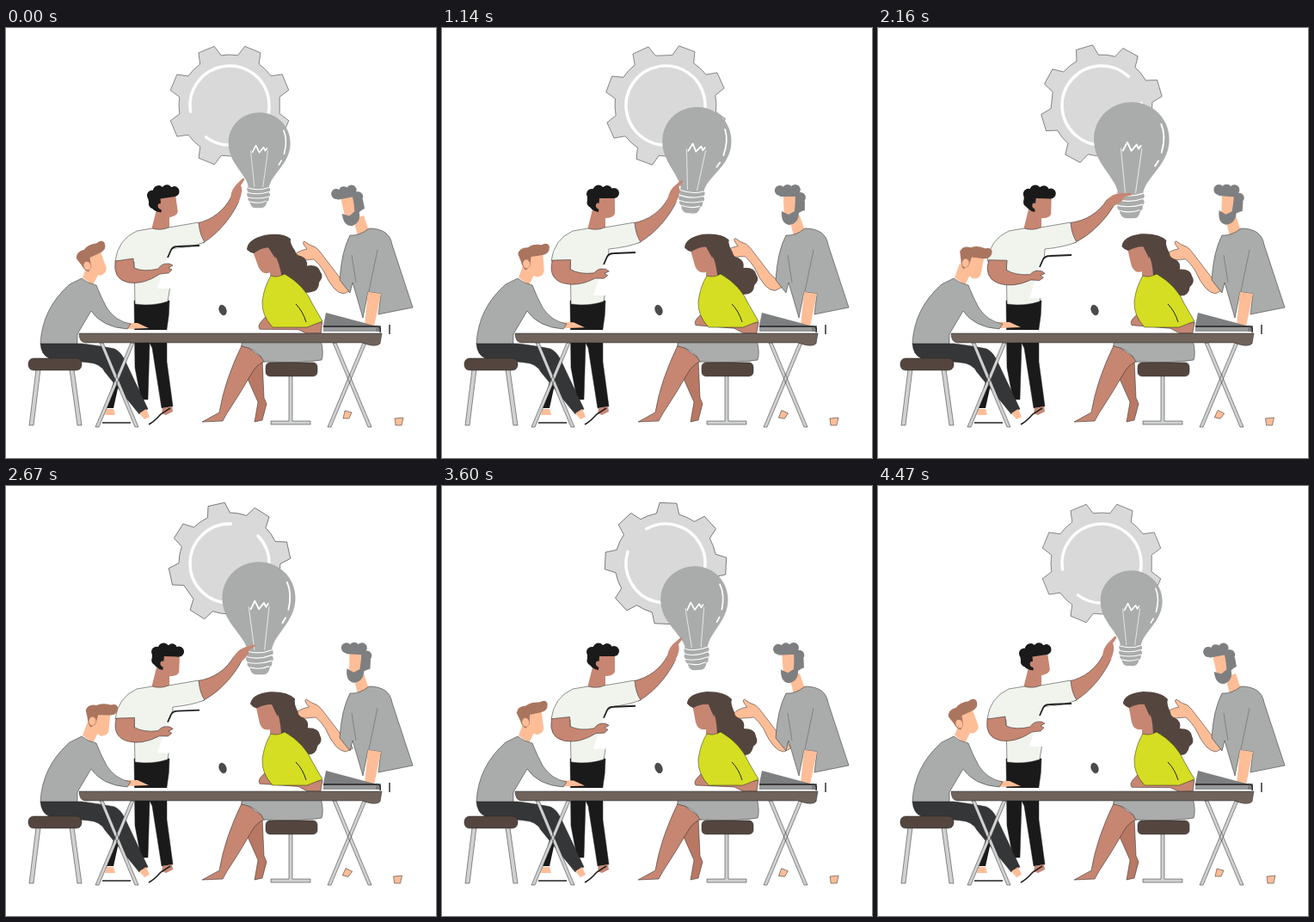
These frames come from a looping animation (500x500 px, 4530 ms). An HTML page:

```html
<!DOCTYPE html>
<html lang="en">
<head>
<meta charset="utf-8">
<title>Team at a table</title>
<style>
  html, body { margin: 0; width: 100%; height: 100%; overflow: hidden; background: #fff; }
  svg { display: block; width: 100vw; height: 100vh; }
  .edge { stroke: #222; stroke-width: .5; }
  .line { fill: none; stroke: #222; }
  .gray { fill: #a9acaa; }
  .ash { fill: #7d7f80; }
  .peach { fill: #fdbd97; }
  .tan { fill: #c68672; }
  .black { fill: #1a1a1b; }
  .brown { fill: #54463f; }
  .shirt { fill: #f0f4ed; }
  .leg { fill: #d0d1d1; }
  .white { fill: none; stroke: #fff; stroke-linecap: round; stroke-linejoin: round; }
</style>
</head>
<body>
<svg viewBox="0 0 500 500">
  <g id="gear">
    <path id="teeth" class="edge" fill="#d9d9d9"/>
    <circle class="white" r="46" stroke-width="3.4" pathLength="360" stroke-dasharray="316 44" transform="rotate(171)"/>
  </g>

  <g id="bulb">
    <path class="gray" d="M0-55.500C20-55.500 36-40 36-20C36 0 22 10 14 25Q12 29 12 33H-12Q-12 29-14 25C-22 10-36 0-36-20C-36-40-20-55.500 0-55.500Z"/>
    <path class="gray" d="M-12 31H12Q15 34 12 37Q15 40 12 43Q13 47 10 48Q9 55 4 55.500H-4Q-9 55-10 48Q-13 47-12 43Q-15 40-12 37Q-15 34-12 31Z"/>
    <path class="white" d="M-12 32.500Q0 36 12 31.500M-12 38Q0 41 12 36.500M-12 43.500Q0 46 12 42M-9 48.500Q0 51 9 47.500"/>
    <path class="white" opacity=".65" d="M-10-11L-5 31M10-11L5 31"/>
    <path class="white" stroke-width="1.600" d="M-8-9L-4-17L0-9L5-15L7-11L9-14"/>
    <path class="white" stroke-width="1.600" d="M28-35Q33-24 29-8M26 0L23 5"/>
  </g>

  <!-- presenter -->
  <path class="black edge" d="M149 317H190Q190 334 187 350L187 388L194 440L181 442L170 372L167 366L165 432L157 432L150 395Z"/>
  <path class="tan" d="M182 442L193 440L194 446L186 450L181 448Z"/>
  <path class="tan" d="M175 211L190 215L190 235L169 235Z"/>
  <g id="head2">
    <path class="tan" d="M177 195H201V216Q199 221 190 221L180 217Z"/>
    <path class="black" d="M169 194Q174 184 188 185L200 190L200 198H183L182 214Q173 213 169 203Z"/>
    <g class="black">
      <circle cx="174" cy="193" r="6"/><circle cx="182" cy="189" r="6.500"/>
      <circle cx="192" cy="189" r="6"/><circle cx="200" cy="192" r="6"/>
      <circle cx="174" cy="203" r="5.500"/>
    </g>
    <path class="tan" d="M184 204Q178 202 179 208Q181 212 185 210Z"/>
  </g>
  <g id="raised">
    <path class="tan edge" d="M222 227C240 223 254 212 262 196L271 201C264 217 249 238 229 250Z"/>
    <path id="hand2" class="tan" d="M261 200C261 192 264 186 268 182L275 175Q278 174 277 177L273 183C276 189 273 196 270 204Z"/>
  </g>
  <path class="shirt edge" d="M170 233Q180 236 189 232L224 226Q225 240 231 249Q215 255 194 257L191 300L188 318Q170 324 150 321L149 272L127 271Q130 246 152 236Z"/>
  <g id="tablet">
    <path fill="#fff" d="M191 257L227 254L208 303H176Z"/>
    <path class="line" stroke-width="1.800" d="M188 267L192 258Q194 254 200 254L225 253"/>
  </g>
  <path id="arm2" class="tan edge" d="M127 271L148 268L149 279Q160 284 177 280Q181 273 190 274L194 276L189 279L193 281L189 285L179 286Q160 299 142 296Q124 292 127 271Z"/>

  <!-- seated man -->
  <path fill="#fff" d="M85 351H190V356H85Z"/>
  <path class="black" d="M128 400L132 410L125 442L117 442Z"/>
  <path class="peach" d="M117 443L125 443L127 450L115 450Z"/>
  <path class="edge" fill="#353638" d="M40 367H88Q112 370 126 373Q133 376 138 386L165 443L155 449L115 400Q110 390 96 389L50 384Q41 380 40 367Z"/>
  <path class="peach" d="M155 448L163 443L167 452L161 455Z"/>
  <path class="line" stroke-width="1.600" d="M112 459H145M166 461Q172 458 180 449L191 442"/>
  <path class="peach" d="M95 274L89 290L101 299L109 283Z"/>
  <g id="head1">
    <path class="peach" d="M98 264H119V284Q117 290 110 290L100 284Z"/>
    <path fill="#aa755f" d="M90 262Q92 254 102 255Q108 251 118 253Q126 250 127 256Q127 265 117 265L105 266L103 277L98 281Q94 278 93 271Z"/>
    <ellipse class="peach" cx="99" cy="274" rx="4" ry="5"/>
  </g>
  <path id="hand1" class="peach" d="M139 343L153 343L166 349L139 350Z"/>
  <path class="gray edge" d="M88 291Q95 297 105 299Q110 312 117 325Q127 341 145 344L141 350Q112 348 99 329L83 356V367H40Q42 326 74 298Z"/>

  <!-- standing man -->
  <path id="arm4" class="peach edge" d="M398 298L389 290L366 260Q362 254 354 252L348 248Q344 249 351 257Q340 259 335 265Q331 268 335 271L359 269Q365 274 370 282Q382 309 394 309L402 305Z"/>
  <path class="peach" d="M404 222L416 218L422 236L409 242Z"/>
  <path class="gray edge" d="M400 241Q411 242 422 233Q446 233 449 252L473 325L433 333L436 309L421 307L415 337L403 296L400 308L388 293Q390 260 400 241Z"/>
  <path class="peach" d="M421 307L436 309L428 347L417 346Z"/>
  <path fill="none" stroke="#777" stroke-width=".8" d="M432 258L422 306M402 264L407 296"/>
  <g id="head4">
    <path class="peach" d="M397 194H413V222H398Z"/>
    <path class="ash" d="M395 213L403 217L410 213Q411 204 411 196L422 201V212Q420 212 415 215Q415 227 404 229Q394 228 395 213Z"/>
    <g class="ash">
      <circle cx="393" cy="189" r="6"/><circle cx="402" cy="188" r="6"/>
      <circle cx="411" cy="188" r="6"/><circle cx="417" cy="197" r="6"/>
      <path d="M393 187H413V196H393Z"/>
    </g>
  </g>
  <g class="peach edge">
    <path d="M394 445L402 447L399 454L392 454Z" id="foot1"/>
    <path d="M452 454L462 453L460 462H453Z" id="foot2"/>
  </g>

  <!-- seated woman -->
  <path class="edge" fill="#b97863" d="M286 385H298L300 430L303 437L298 456L289 458L293 435L281 408Z"/>
  <path class="tan edge" d="M275 367L303 387Q292 390 286 401Q271 427 257 448L252 457L228 458L248 447Q254 410 275 367Z"/>
  <path class="edge" fill="#abadac" d="M274 363H366Q370 378 367 386Q345 390 300 388Q293 373 274 370Z"/>
  <path id="arm3" class="tan edge" d="M368 342L366 355H350L340 350L295 348Q292 344 298 338L303 333Q307 341 318 344L347 346Z"/>
  <g id="head3">
    <path class="brown" d="M285 253Q286 241 308 239Q329 239 337 248Q335 253 340 263Q340 268 346 270Q353 274 351 282Q364 282 365 291Q369 298 362 303Q360 314 350 313Q338 314 333 302L315 286L309 255Z"/>
    <path class="tan" d="M291 254Q303 255 309 252L314 263Q319 265 320 289L307 290L307 283Q298 285 295 275Z"/>
    <path class="brown" d="M285 253Q286 242 308 240L318 254L316 268L310 254Q302 253 292 258Q288 257 285 253Z"/>
  </g>
  <path class="edge" fill="#d5de22" d="M308 288Q315 291 324 286Q347 299 357 322L368 341L350 348H310Q297 334 298 318Q300 301 308 288Z"/>
  <path class="line" d="M337 321Q345 329 349 342"/>
  <ellipse class="edge" fill="#4a4b4c" cx="252" cy="328" rx="4" ry="6" transform="rotate(-20 252 328)"/>

  <!-- furniture -->
  <g class="leg edge">
    <path d="M35 397H40L32 462H27ZM74 397H79L88 462H83Z"/>
    <path d="M329 404H333V457H354V461H308V457H329Z"/>
    <path d="M145 366H149L108 464H104ZM109 366H113L154 464H150Z"/>
    <path d="M415 366H419L378 464H374ZM380 366H384L425 464H421Z"/>
  </g>
  <rect class="brown edge" x="26" y="384" width="62" height="14" rx="6"/>
  <rect class="brown edge" x="302" y="389" width="60" height="16" rx="5"/>
  <path class="ash" d="M372 331L428 346H436V353H369V346Z"/>
  <path fill="#969899" d="M369 348H430V353H369Z"/>
  <path class="line" d="M369 347H430Q437 346 435 354M446 345V356" stroke-width="1.400"/>
  <path class="edge" fill="#70635b" d="M85 355H437L435 367Q431 371 420 368L414 366H92Q85 365 85 355Z"/>
</svg>
<script>
const LOOP = 4530, END = 4470;
const TIMES = [0, 510, 1140, 2160, 3210, 3990, END];
const move = (id, transform) => document.getElementById(id).setAttribute('transform', transform);
const turn = (id, angle, x, y) => move(id, `rotate(${angle} ${x} ${y})`);

function pose(t, values) {
  let i = 0;
  while (i < 5 && t > TIMES[i + 1]) i++;
  const k = (t - TIMES[i]) / (TIMES[i + 1] - TIMES[i]);
  return values[i] + (values[i + 1] - values[i]) * k;
}

// Triangle wave: 0, 1, 0, -1, 0 over one unit
const swing = p => 2 / Math.PI * Math.asin(Math.sin(2 * Math.PI * p));

function gearPath() {
  const at = (deg, r) => {
    const a = deg * Math.PI / 180;
    return `${r * Math.cos(a)} ${r * Math.sin(a)}`;
  };
  let d = '';
  for (let c = 22.5; c < 360; c += 45) {
    d += `${d ? 'A59 59 0 0 1' : 'M'}${at(c - 13, 59)}L${at(c - 8, 71)}L${at(c + 8, 71)}L${at(c + 13, 59)}`;
  }
  return d + 'Z';
}
document.getElementById('teeth').setAttribute('d', gearPath());

function draw(now) {
  const t = Math.min(now % LOOP, END), p = t / END;
  const rise = 1 - Math.abs(2 * p - 1), wave = swing(p), arc = Math.sin(Math.PI * p);
  move('gear', `translate(260 90) rotate(${-360 * p})`);
  move('bulb', `translate(294.3 153.7) rotate(${1 + 4.5 * wave}) scale(${1 + .225 * rise})`);

  turn('head1', -20 + 32 * rise, 104, 288);
  move('hand1', `translate(0 ${-arc})`);

  turn('head2', pose(t, [-8, -2.5, 0, 1.5, 2.5, -2.5, -8]), 184, 223);
  turn('raised', pose(t, [0, 0, 2, 6, 2, 0, 0]), 228, 238);
  turn('hand2', pose(t, [0, -12, 2, 39, 8, -2, 0]), 267, 199);
  const drop = pose(t, [0, 4, 8, 11, 4, 1.5, 0]);
  turn('arm2', drop * .85, 136, 282);
  move('tablet', `translate(0 ${drop})`);

  turn('head3', pose(t, [-9, -7, -5, -2.5, 0, 0, 0]), 315, 285);
  turn('arm3', pose(t, [-2, 0, 2, 2, 1, -1, -2]), 362, 348);

  turn('head4', -11 + 15 * arc, 409, 237);
  const reach = -6 * wave;
  move('arm4', `translate(${reach - 1} ${reach > 0 ? 0 : reach * .6})`);
  turn('foot1', 14 * arc, 397, 450);
  move('foot2', `translate(${-1.5 * arc} 0)`);
  requestAnimationFrame(() => draw(performance.now()));
}
draw(0);
</script>
</body>
</html>
```
